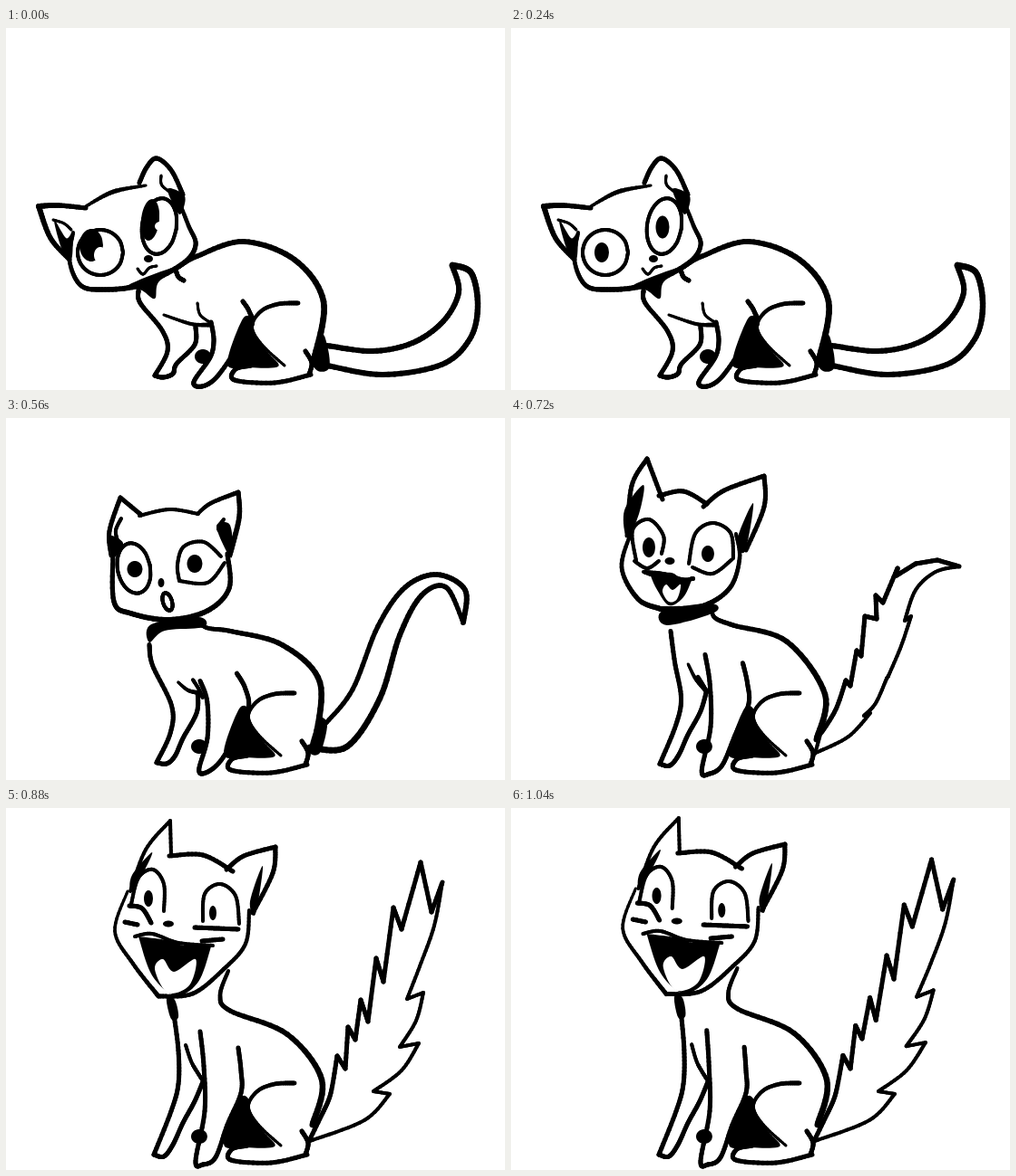
These frames come from a looping animation (550x400 px, 1.28 s). An HTML page with a canvas:

```html
<!DOCTYPE html>
<html lang="en">
<head>
<meta charset="utf-8">
<title>Cat</title>
<style>
html, body { margin: 0; width: 100%; height: 100%; overflow: hidden; background: #fff; }
canvas { display: block; }
</style>
</head>
<body>
<canvas id="stage" width="550" height="400"></canvas>
<script>
const LOOP = 1280;
const ctx = document.getElementById('stage').getContext('2d');
ctx.lineCap = ctx.lineJoin = 'round';

function ellipse([cx, cy], [rx, ry], [turn] = [0]) {
  const c = Math.cos(turn), s = Math.sin(turn);
  return Array.from({ length: 13 }, (_, i) => {
    const x = rx * Math.cos(i * Math.PI / 6), y = ry * Math.sin(i * Math.PI / 6);
    return [cx + x * c - y * s, cy + x * s + y * c];
  });
}

// One mark per line: "brush|points". A brush is a fill colour or the widths along a stroke;
// a leading "oval" takes centre, radii and turn. "!" makes a point a sharp corner.
function parse(text) {
  return text.trim().split('\n').map(line => {
    const [brush, list] = line.split('|');
    const points = list.replace(/(\S+)!/g, '$1 $1').split(' ').map(p => p.split(',').map(Number));
    return brush.startsWith('oval')
      ? { brush: brush.slice(5), points: ellipse(...points) }
      : { brush, points };
  });
}

const mapPoints = (pose, fn) => pose.map((mark, i) =>
  ({ brush: mark.brush, points: mark.points.map((p, j) => fn(p, i, j)) }));

const mix = (a, b, t) => mapPoints(a, (p, i, j) =>
  p.map((v, k) => v + (b[i].points[j][k] - v) * t));

const shift = (pose, dx) => mapPoints(pose, ([x, y]) => [x + dx, y]);

// Stretch the upper part up and to the right
const stretch = (pose, amount) => mapPoints(pose, ([x, y]) => {
  const k = amount * Math.min(1, Math.max(0, (290 - y) / 100));
  return [x + (2 + x / 100) * k, y - 3 * k];
});

const spline = (a, b, c, d, t) =>
  b + t / 2 * (c - a + t * (2 * a - 5 * b + 4 * c - d + t * (3 * (b - c) + d - a)));

function curve(points, closed) {
  const n = points.length, steps = 10;
  const at = i => points[closed ? (i + n) % n : Math.min(n - 1, Math.max(0, i))];
  const out = [points[0]];
  for (let i = 0; i < (closed ? n : n - 1); i++) {
    const [a, b, c, d] = [at(i - 1), at(i), at(i + 1), at(i + 2)];
    if (b[0] === c[0] && b[1] === c[1]) continue;
    for (let s = 1; s <= steps; s++)
      out.push([0, 1].map(k => spline(a[k], b[k], c[k], d[k], s / steps)));
  }
  return out;
}

function drawMark({ brush, points }) {
  const filled = /[a-z]/.test(brush);
  const line = curve(points, filled);
  if (filled) {
    ctx.fillStyle = brush;
    ctx.beginPath();
    line.forEach(p => ctx.lineTo(...p));
    ctx.fill();
    return;
  }
  const widths = brush.split(' ').map(Number);
  for (let i = 1; i < line.length; i++) {
    const u = i / line.length * (widths.length - 1), k = Math.floor(u);
    ctx.lineWidth = widths[k] + ((widths[k + 1] ?? widths[k]) - widths[k]) * (u - k);
    ctx.beginPath();
    ctx.moveTo(...line[i - 1]);
    ctx.lineTo(...line[i]);
    ctx.stroke();
  }
}

const hind = parse(`
5 3|318,304 296,305 277,313 267,330 278,350 303,373
black|256,323 267,321 270,340 284,358 296,374 262,375 240,371
5|266,373 249,377 248,389 292,392 332,383
5|326,357 333,370 330,383
oval black|213,363 9,8`);

// Front legs, from crouched to upright
const legsLow = parse(`
5|146,290 148,304 172,334 178,357 164,384! 173,386 184,382 188,371 208,350 209,330
3 5|174,317 204,327 224,328
5|226,325 229,345 225,364 207,391 216,396 232,386 254,355 271,328 268,313 261,302
3|211,304 214,317 226,326`);
const legsMid = parse(`
5|149,258 152,275 180,322 181,352 167,380! 178,381 187,374 195,356 211,326 209,304
3 5|187,302 199,307 211,305
5|214,305 223,323 223,360 214,388 222,391 238,377 256,352 270,322 265,301 254,288
4|206,291 213,302 217,312`);
const legsHigh = parse(`
5|185,228 190,268 190,305 182,335 163,383! 174,385 184,372 195,348 208,324 218,300
4|198,262 205,282 216,300
5|214,247 218,285 219,335 209,390 217,394 231,386 244,350 259,315 259,290 256,265
4|206,284 211,292 216,300`);

// Crouching
const crouchHead = parse(`
5 6 5|88,199 58,196 36,197! 49,232 70,256
black|53,212 66,232 73,228 72,256 62,246
3|52,212 64,216 72,223
3 5 3|88,197 118,181 154,174
5|147,171 155,154 166,144 182,157 195,184
3|171,163 172,174 186,185
black|178,178 196,184 196,198 190,205
4 6 4|190,190 201,218 209,240 194,261 148,284 106,289 82,284 70,257 74,226
oval 4|104,248 25,25
oval 4|169,219 19,31 .15
oval black|157,255 5,4
3|145,266 151,272 158,265 166,263`);
const crouchRear = parse(`
black|135,284 190,263 168,281 164,299 150,290
5|187,267 190,275 196,279
5 7|190,264 211,252 262,236 318,256 350,302 340,365
black|348,338 355,355 356,376 344,379 337,366
6|354,351 404,357 448,348 482,324 499,292 492,263
7 6 6|492,262 513,271 520,308 511,344 480,372 415,383 354,373`);
const gazeUp = parse(`
oval black|94,240 13,18
oval white|104,251 7,9
oval black|159,212 10,23 .1
oval white|170,219 6,5`);
const gazeAhead = parse(`
oval black|100,248 8,11
oval white|104,252 0,0
oval black|167,220 7.5,12.5
oval white|170,224 0,0`);

// Rising
const riseHead = parse(`
5|76,192 66,162 66,134! 91,140 96,148
black|69,168 83,182 81,200 74,190
3|74,147 81,164 80,182
5|92,149 120,133 157,132
5 6|158,133 173,117 195,100! 207,125 214,170
4|192,128 188,140 207,156
black|187,141 214,150 215,173 204,163
5 6 4|211,170 220,200 200,225 160,246 108,246 87,228 79,186
oval 4|118,207 20,28 -.3
oval 4|183,188 20,28 .1
oval black|115,206 8.5,9.5
oval black|182,185 8,10
oval black|155,222 5.5,3.5
3|143,234 150,238 157,232 165,234 175,228`);
const riseRear = parse(`
black|146,252 190,236 199,243 150,264
4 7|190,240 207,247 245,236 295,243 347,296 335,375
black|347,335 355,347 350,374 334,372
5 6|352,340 377,345 408,322 445,261 487,239 512,258 517,296
7 5|335,376 390,368 426,328 455,275 482,260 502,272 512,296
black|506,268 515,268 518,296 511,297`);

// Alert
const alertHead = parse(`
5|116,152 114,125 126,88! 149,107
4|127,111 121,124 123,136
black|112,130 129,138 118,154
4|147,108 180,101 212,106
4 6|211,106 226,94 256,82! 257,110 247,150
4|240,112 234,122 241,130
black|232,120 246,117 250,140 247,154
5 6 5|244,150 246,188 222,213 180,223 138,216 119,203 118,148
oval 4|141,166 18,28 -.2
4|237,153 218,137 196,142 189,162 191,180! 222,182 241,160
oval black|142,167 8.5,9
oval black|208,161 8.5,10
oval black|171,182 3.5,5
oval 4|178,203 5,10 -.3`);
const alertRear = parse(`
black|160,228 212,220 218,231 175,235 158,248
4 7|210,224 222,232 250,236 305,251 346,292 340,362
black|345,333 354,339 346,370 334,367
5 6|352,338 382,300 410,230 440,187 475,173 506,190 504,226
7 5|335,364 376,363 412,310 434,240 458,196 485,187 504,226`);

// Smiling and laughing share their structure so that they can be blended
const smileHead = parse(`
5|128,130 133,75 150,45! 167,90
black|125,102 146,74 141,106 128,132
5|163,86 190,81 216,95
5|212,98 235,80 279,64! 279,98 259,146
black|267,94 249,135 258,147
4 6|133,125 122,165 140,200 165,211
6 4|165,211 210,208 241,188 252,155 248,128
black|167,213 220,205 224,215 172,229
4 7|222,207 224,220 245,229 304,247 346,305 337,355`);
const laughHead = parse(`
4|137,92 154,46 181,14! 182,53
black|139,74 161,49 151,72 138,92
5|180,53 217,52 250,70
5|243,68 262,53 297,43! 294,72 272,116
black|283,64 269,103 275,117
3 5|134,92 120,136 140,172 168,208
5 4|168,208 206,205 240,178 264,150 268,113
black|177,211 186,212 190,231 182,233
4 7|245,180 236,207 247,224 310,250 348,300 338,350`);

const smileFace = parse(`
4|138,158 134,124 152,112 168,130 166,150
4|136,158 150,166 163,158
4|196,161 203,128 222,116 242,127 245,155
4|200,165 222,172 244,156
oval black|152,143 7,11
oval black|217,150 7,9
oval black|175,158 5.5,4
4|146,170 154,173
4|197,178 201,177
black|153,172! 177,171 187,178 200,177! 190,198 174,207 160,188
white|167,192 171,184 178,190 187,184 183,200 174,203
4|147,170 168,172 188,178 201,178`);
const laughFace = parse(`
4|138,106 146,77 162,68 174,84 174,114
5|136,108 150,111 160,127
4|217,125 219,95 236,84 253,97 257,128
5|208,132 232,133 256,134
oval black|157,100 5,9
oval black|228,116 4,8
oval black|179,128 6,3.5
5|131,126 145,129
5|216,147 239,145
black|146,142! 177,146 197,152 227,150! 212,192 187,207 161,185
white|164,178 173,167 185,181 209,167 202,196 178,204
4|142,142 161,139 190,149 228,152`);

const smileTail = parse(`
5|342,348 358,322 369,290! 374,296! 381,257! 386,263! 390,219! 403,222! 402,196! 410,204! 426,166! 425,174! 446,161! 470,157! 494,164!
4|494,164 468,170 446,190 434,224! 441,219! 430,252 416,285! 414,288! 402,315 389,329! 396,326! 372,352 336,370
4|335,371 342,346`);
const laughTail = parse(`
5|350,335 358,315 365,274! 374,288! 377,242! 385,256! 391,212! 399,236! 408,166! 416,192! 427,110! 436,134! 457,60! 469,115! 481,82!
4|481,82 472,130 456,175 442,211! 460,204! 452,235 434,264! 455,260! 436,290 405,313! 423,316! 395,345 335,368
5|334,368 350,335`);

const crouch = [...shift(hind, 4), ...legsLow, ...crouchRear, ...crouchHead];
const rise = [...shift(hind, 4), ...legsMid, ...riseRear, ...riseHead];
const alert = [...hind, ...mix(legsMid, legsHigh, 0.25), ...alertRear, ...alertHead];
const smile = [...hind, ...mix(legsMid, legsHigh, 0.75), ...smileTail, ...smileHead, ...smileFace];
const laugh = [...hind, ...legsHigh, ...laughTail, ...laughHead, ...laughFace];

const timeline = [
  [0, [...crouch, ...gazeUp]],
  [160, [...crouch, ...mix(gazeUp, gazeAhead, 0.5)]],
  [240, [...crouch, ...gazeAhead]],
  [480, rise],
  [560, alert],
  [720, smile],
  [800, mix(smile, laugh, 0.5)],
  [880, laugh],
  [960, stretch(laugh, 2)],
  [1040, stretch(laugh, 1)]
];

function render() {
  const time = performance.now() % LOOP;
  const [, pose] = timeline.findLast(([start]) => start <= time);
  ctx.fillStyle = 'white';
  ctx.fillRect(0, 0, 550, 400);
  pose.forEach(drawMark);
  requestAnimationFrame(render);
}
render();
</script>
</body>
</html>
```
